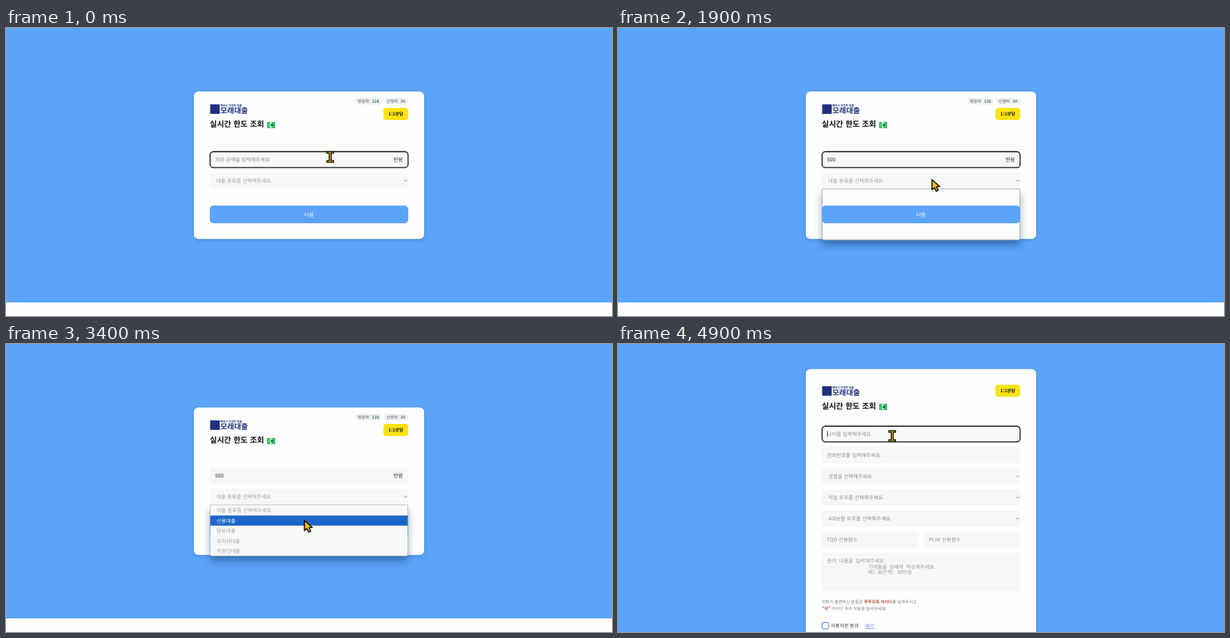
An HTML page that plays this animation: 800 by 382 pixels, repeating every 5 s.

```html
<!DOCTYPE html>
<html lang="ko">
<head>
<meta charset="utf-8">
<title>한도 조회</title>
<style>
html, body { margin: 0; width: 100%; height: 100%; overflow: hidden; background: #5ca4f9; }
svg { display: block; width: 100%; height: 100%; }
text {
  font-family: "Noto Sans CJK KR", "Noto Sans CJK JP", "Noto Sans CJK", "Noto Sans", sans-serif;
  text-rendering: geometricPrecision;
  white-space: pre;
}
.mono { font-family: "Noto Sans Mono CJK KR", "Noto Sans Mono CJK JP", "Noto Sans Mono", monospace; }
</style>
</head>
<body>
<svg id="stage" viewBox="0 0 800 382" lang="ko">
  <defs>
    <filter id="soft" x="-10%" y="-10%" width="120%" height="130%">
      <feDropShadow dx="0" dy="1.5" stdDeviation="2" flood-color="#123a70" flood-opacity=".25"/>
    </filter>
    <filter id="deep" x="-10%" y="-20%" width="120%" height="170%">
      <feDropShadow dx="0" dy="7" stdDeviation="5" flood-color="#0b2a55" flood-opacity=".38"/>
    </filter>
  </defs>
  <rect width="800" height="382" fill="#5ca4f9"/>
  <g id="page1"></g>
  <g id="page2"></g>
  <g id="arrow">
    <path d="M0 0V13.4L3.2 10.7L5.5 15.5L8.2 14.2L6 9.6L10.2 9.3Z" fill="#f6bd13" stroke="#15110a" stroke-width="1.5" stroke-linejoin="round"/>
  </g>
  <g id="beam">
    <path d="M-4.5 -7.2H4.5V-4.8H1.4V4.8H4.5V7.2H-4.5V4.8H-1.4V-4.8H-4.5Z" fill="#c99a28" stroke="#1c1508" stroke-width="1.2" stroke-linejoin="round"/>
  </g>
  <g id="hand">
    <path d="M-1.5 9.5V1.2C-1.5 -.7 1.3 -.7 1.3 1.2V6C1.8 5 3.7 5.1 3.9 6.4C4.6 5.5 6 5.8 6.2 7C7.2 6.4 8.3 7 8.3 8.2V12.6C8.3 15.6 6.8 18 3.9 18H1.6C-.5 18 -1.6 17 -2.7 15.3L-5.5 10.9C-6.4 9.3 -4.4 8.1 -3.3 9.3L-1.5 11.2Z" fill="#f9c60c" stroke="#15110a" stroke-width="1.3" stroke-linejoin="round"/>
    <path d="M1.3 6V9.6M3.9 6.8V9.8M6.2 7.3V10" fill="none" stroke="#15110a" stroke-width=".8"/>
  </g>
</svg>
<script>
const NS = "http://www.w3.org/2000/svg";
const $ = id => document.getElementById(id);
const p1 = $("page1"), p2 = $("page2");
const SIZE = 6.75, PAPER = "#fdfefd", FIELD = "#f6f8f7", BLUE = "#5ca4f9";
const HINT = "#8a8f8f", PALE = "#a0a3a3", INK = "#1c1f22", NAVY = "#20307c";

function add(parent, tag, attrs) {
  const el = document.createElementNS(NS, tag);
  for (const k in attrs) el.setAttribute(k, attrs[k]);
  parent.appendChild(el);
  return el;
}
function box(parent, x, y, w, h, r, fill, more) {
  return add(parent, "rect", { x, y, width: w, height: h, rx: r, fill, ...more });
}
// Places text by its vertical centre.
function label(parent, x, cy, str, fill, size = SIZE, more) {
  const el = add(parent, "text", { x, y: cy + size * .37, "font-size": size, fill, ...more });
  el.textContent = str;
  return el;
}
function show(el, on) { el.setAttribute("display", on ? "inline" : "none"); }

function ring(parent, y, h) {
  return box(parent, 269.4, y, 261.4, h, 4.5, "none", { stroke: "#111", "stroke-width": 1.3 });
}
function caret(parent, cy) {
  return box(parent, 276, cy - 4, .7, 8, 0, "#111");
}
function chevron(parent, cy, color) {
  return add(parent, "path", {
    d: `M525.7 ${cy - .9}l1.9 1.9l1.9 -1.9`, fill: "none", stroke: color, "stroke-width": 1
  });
}
function select(parent, y, str, color) {
  box(parent, 269, y, 262, 20.8, 4, FIELD);
  return [label(parent, 277.5, y + 10.3, str, color), chevron(parent, y + 10.4, color)];
}
function header(parent, dy, chatY) {
  const g = add(parent, "g", { transform: `translate(0 ${dy})` });
  box(g, 269.5, 101.3, 12.6, 12.6, 0, NAVY);
  label(g, 283, 103, "빠르고 안전한 대출", NAVY, 3.6, { "font-weight": 700 });
  label(g, 283, 109.5, "모래대출", NAVY, 9.9, { "font-weight": 900 });
  label(g, 269, 127.5, "실시간 한도 조회", "#0c0d0f", 10.25, { "font-weight": 700 });
  box(g, 344.8, 124.7, 10.4, 8, .6, "#1f9d57");
  box(g, 345.7, 125.7, 8.6, 6, .3, "#3fd07c");
  box(g, 348.6, 124.7, 2, 8, 0, "#f2efb4");
  add(g, "circle", { cx: 351.2, cy: 128.7, r: 1.8, fill: "#14713d" });
  box(parent, 498.3, chatY, 32.6, 16, 4, "#fae312");
  label(parent, 514.6, chatY + 8.2, "1:1상담", "#17150a", 5.9, { "font-weight": 700, "text-anchor": "middle" });
}

// First page
box(p1, 0, 364, 800, 18, 0, PAPER);
box(p1, 248, 84.3, 304, 195.5, 6, PAPER, { filter: "url(#soft)" });
for (const [x, w, name, nx, n] of [[461, 35, "방문자:", 483.3, "128"], [499, 32, "신청자:", 520.8, "30"]]) {
  box(p1, x, 92.5, w, 9, 4.5, "#eef1f3");
  label(p1, x + 3.6, 97, name, "#454b55", 5.25, { "font-weight": 500 });
  label(p1, nx, 97, n, "#47705c", 5.25, { "font-weight": 700 });
}
header(p1, 0, 106);
box(p1, 269, 164, 262, 21.4, 4, FIELD);
const ring1 = ring(p1, 164, 21.2);
const amount = label(p1, 276, 174.4, "", INK);
const caret1 = caret(p1, 174.3);
label(p1, 511.5, 174.8, "만원", "#222", SIZE, { "font-weight": 500 });
const [kind, kindArrow] = select(p1, 192, "", PALE);

const popup = add(p1, "g", {});
box(popup, 269.4, 213.4, 261.2, 67.6, 2, "#fcfdfd", { stroke: "#9c9fa3", "stroke-width": .8, filter: "url(#deep)" });
const button = add(p1, "g", {});
const buttonFace = box(button, 269, 235.5, 262, 23.4, 5, BLUE);
label(button, 400, 247.3, "다음", "#fff", SIZE, { "text-anchor": "middle", "font-weight": 500 });

const list = add(p1, "g", {});
box(list, 269.8, 213.8, 260.4, 66.8, 1.6, "#f7f9f8");
const ROW = 13.45, TOP = 214;
const rows = ["대출 종류를 선택해주세요.", "신용대출", "담보대출", "무직자대출", "직장인대출"].map((str, i) => ({
  bar: box(list, 269.6, TOP + ROW * i, 260.8, ROW, 0, "#1d66c9"),
  text: label(list, 278, TOP + ROW * (i + .5), str, PALE)
}));

// Second page
box(p2, 248, 33.3, 304, 370, 6, PAPER, { filter: "url(#soft)" });
header(p2, -45.3, 54);
const fieldY = i => 108.8 + 28.1 * i;
["나이를 입력해주세요.", "전화번호를 입력해주세요."].forEach((str, i) => {
  box(p2, 269, fieldY(i), 262, 20.8, 4, FIELD);
  label(p2, 276, fieldY(i) + 10.3, str, HINT);
});
["성별을 선택해주세요.", "직업 유무를 선택해주세요.", "4대보험 유무를 선택해주세요."].forEach((str, i) =>
  select(p2, fieldY(i + 2), str, HINT));
[[269, "TQD 신용점수"], [403.5, "PLIM 신용점수"]].forEach(([x, str]) => {
  box(p2, x, fieldY(5), 127.5, 20.8, 4, FIELD);
  label(p2, x + 6.8, fieldY(5) + 10.3, str, HINT);
});
box(p2, 269, 277.3, 262, 50.5, 4, FIELD);
[[276, "문의 내용을 입력해주세요."], [330, "기대출을 상세히 작성해주세요."], [330, "예) 00은행: 00만원"]].forEach(([x, str], i) =>
  label(p2, x, 287.4 + 7.7 * i, str, "#979c9c", SIZE, { class: "mono" }));

function note(cy, parts) {
  const el = label(p2, 269, cy, "", "#74787c", 5.55);
  parts.forEach(([str, strong]) => {
    add(el, "tspan", strong ? { fill: "#b4563f", "font-weight": 700 } : {}).textContent = str;
  });
}
note(342, [["전화가 불편하신 분들은 "], ["루루모톡 아이디", 1], ["를 남겨주시고"]]);
note(350.5, [["\"꼭\"", 1], [" 아이디 추가 허용을 눌러주세요!"]]);
box(p2, 269.5, 369.5, 8.4, 8.4, 1.6, "#fff", { stroke: "#4a88c2", "stroke-width": 1 });
label(p2, 281, 374, "이용약관 동의", "#33373b", 6.35);
label(p2, 326.5, 374, "보기", "#3f7fd0", 6.3);
box(p2, 326.5, 377.2, 11.6, .6, 0, "#3f7fd0");
const ring2 = ring(p2, 109, 20.8);
const caret2 = caret(p2, 119.2);

// Pointer path: time, x, y
const PATH = [
  [0, 428, 171], [1500, 428, 171], [1800, 414.5, 201], [2200, 414.5, 201],
  [2700, 396, 242], [2900, 396, 242], [3100, 394, 257], [3200, 394, 257],
  [3400, 394, 234], [3500, 394, 234], [3700, 396.3, 247], [4100, 396.3, 247],
  [4600, 362, 122], [5000, 362, 122]
];
function pointer(t) {
  const i = Math.max(1, PATH.findIndex(k => k[0] > t));
  const [t0, x0, y0] = PATH[i - 1], [t1, x1, y1] = PATH[i];
  const u = (t - t0) / (t1 - t0), e = u * u * (3 - 2 * u);
  return [x0 + (x1 - x0) * e, y0 + (y1 - y0) * e];
}
const within = (v, a, b) => v >= a && v < b;
function shape(t, y) {
  if (t < 3900) {
    if (within(y, 164, 186)) return "beam";
    return t >= 3500 && within(y, 235.5, 259) ? "hand" : "arrow";
  }
  return within(y, 109, 130) || within(y, 137, 158) ? "beam" : "arrow";
}

function draw(t) {
  const [x, y] = pointer(t);
  const cursor = shape(t, y);
  for (const id of ["arrow", "beam", "hand"]) show($(id), id === cursor);
  $(cursor).setAttribute("transform", `translate(${x} ${y})`);
  show(p1, t < 3900);
  show(p2, t >= 3900);

  const typed = t < 600 ? "" : "500".slice(0, Math.min(3, t / 100 - 5));
  amount.textContent = typed || "희망 금액을 입력해주세요.";
  amount.setAttribute("fill", typed ? INK : HINT);
  show(ring1, t < 2000);
  show(caret1, within(t, 100, 500) || within(t, 600, 1200) || within(t, 1700, 1900));
  caret1.setAttribute("x", 276.2 + typed.length * SIZE * .555);

  const chosen = t >= 3500;
  kind.textContent = chosen ? "신용대출" : "대출 종류를 선택해주세요.";
  kind.setAttribute("fill", chosen ? INK : PALE);
  kindArrow.setAttribute("stroke", chosen ? INK : HINT);
  show(popup, within(t, 1900, 3500));
  show(list, within(t, 2000, 3500));
  const hover = Math.floor((y - TOP) / ROW);
  rows.forEach((row, i) => {
    const on = i > 0 && i === hover;
    show(row.bar, on);
    row.text.setAttribute("fill", on ? "#fff" : PALE);
    row.text.setAttribute("font-weight", on ? 500 : 400);
  });

  const hot = cursor === "hand";
  buttonFace.setAttribute("fill", hot ? "#5090db" : BLUE);
  buttonFace.setAttribute("filter", hot ? "url(#soft)" : "none");
  button.setAttribute("transform", `translate(0 ${hot ? -.5 : 0})`);

  show(ring2, t >= 4700);
  show(caret2, t >= 4700);
}

function tick() {
  draw(Math.floor(performance.now() % 5000 / 100) * 100);
  requestAnimationFrame(tick);
}
tick();
</script>
</body>
</html>
```
